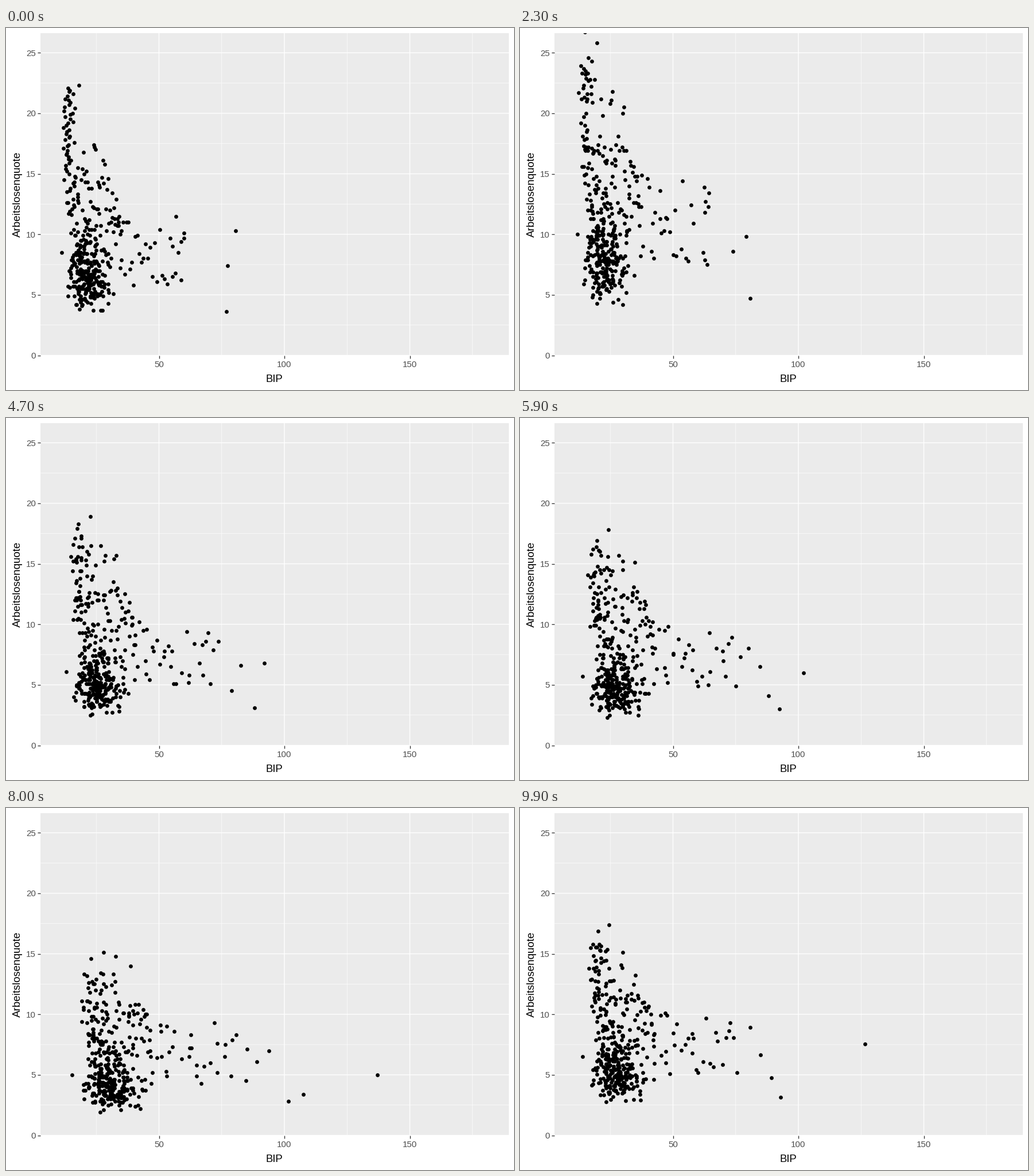
Recreate the animation shown at these times as a matplotlib script. Size 885x632 px, loop 10000 ms.

```python
import numpy as np
import matplotlib.pyplot as plt
from matplotlib.animation import FuncAnimation

W, H, DPI = 885, 632, 128
PX = 72 / DPI  # points per pixel
YEARS = 18
plt.rcParams["font.family"] = "Liberation Sans"
rng = np.random.default_rng(4)
year = np.arange(YEARS)


def keyed(*values, keys=(0, 4, 6, 8, 12, 17)):
    return np.interp(year, keys, values)


# Yearly trends: share of total growth, mean unemployment by region
growth = keyed(0, .12, .24, .35, .62, 1)
west = keyed(6.6, 7.9, 7.6, 4.9, 4.3, 3.7)
east = keyed(17, 18.7, 17, 13, 11, 7.7)
city = west * (1.15 + .032 * year)
old_town = east * (.74 + .018 * year)


def normal(n, cut=2.2):
    return np.clip(rng.normal(size=n), -cut, cut)


def drift(n, size):
    steps = rng.normal(0, size, (YEARS, n))
    steps[0] = 0
    return np.exp(np.cumsum(steps, axis=0))


def group(bip, rate, gain, trend):
    """Districts that share a trend, each with its own small drift."""
    n = len(bip)
    x = bip * (1 + gain * growth[:, None]) * drift(n, .009)
    y = rate * trend[:, None] * drift(n, .025)
    return x, np.maximum(y, .4 * west[:, None])


def single(bip, rate, trend=city):
    """One district from its first and last values, bent along a trend."""
    x = bip[0] + (bip[1] - bip[0]) * growth
    shape = trend / trend[0]
    pull = rate[1] / (rate[0] * shape[-1])
    y = rate[0] * shape * pull ** (year / year[-1])
    return x[:, None], y[:, None]


def car_town():
    x = keyed(80.5, 74, 92, 80, 124, 137, 114, 181, 172.5,
              keys=(0, 4, 8, 9, 11, 14, 15, 16, 17))
    y = keyed(10.3, 5.1, 4.85, keys=(0, 12, 17))
    return x[:, None], y[:, None]


def eastern_countryside(n=62):
    rate = rng.permutation(np.linspace(.68, 1.3, n))
    return group(14.4 * np.exp(.11 * normal(n, 1.8)), rate, .9, east)


def eastern_towns(n=40):
    q = np.linspace(0, 1, n)
    rate = (1.2 - .35 * q) * np.exp(.13 * normal(n, 1.8))
    return group(19 + 16 * q, rate, .45, old_town)


def western_countryside(n=220):
    z = normal(n)
    rate = np.exp(.28 * np.clip(.97 * normal(n) - .25 * z, -2.1, 2.3))
    return group(20.2 * np.exp(.175 * z), rate, .58, west)


def western_cities(n=71):
    q = np.linspace(0, 1, n)
    rate = np.exp((.33 - .15 * q) * normal(n, 1.6))
    return group(24 + 36 * q ** 2.3, rate, .45, city)


def build():
    parts = [
        eastern_countryside(), eastern_towns(),
        western_countryside(), western_cities(), car_town(),
        single((77.3, 92.4), (7.4, 5.9)),
        single((76.9, 108.9), (3.6, 2.7)),
        single((55.4, 123), (6.5, 3)),
        single((56.8, 104.8), (11.5, 6.3)),
        single((60, 84.7), (9.7, 7.6)),
        single((58.8, 92.2), (6.2, 4.2)),
        single((11.2, 16.7), (8.5, 4.5), west),
        single((18.1, 30.9), (22.3, 12.5), east),
    ]
    x, y = (np.hstack(axis) for axis in zip(*parts))
    y = np.round(y, 1)
    # the last year leads back to the first
    return np.vstack([x, x[:1]]), np.vstack([y, y[:1]])


BIP, RATE = build()

# Eleven slow moves of three steps, then seven quick ones of two
START = np.where(year < 11, 3 + 6 * year, 69 + 5 * (year - 11))
STEPS = np.where(year < 11, 3, 2)


def moment(frame):
    return np.clip((frame - START + 1) / STEPS, 0, 1).sum()


def blend(table, t):
    k = min(int(t + 1e-9), YEARS - 1)
    return table[k] + (t - k) * (table[k + 1] - table[k])


fig = plt.figure(figsize=(W / DPI, H / DPI), dpi=DPI, facecolor="white")
left, right, top, bottom = 60, 875.8, 9.2, 571.5
ax = fig.add_axes([left / W, 1 - bottom / H, (right - left) / W, (bottom - top) / H],
                  facecolor="#EBEBEB")
ax.set_xlim((left - 48) / 4.37, (right - 48) / 4.37)
ax.set_ylim(0, (bottom - top) / 21.13)
ax.set_xticks([50, 100, 150])
ax.set_xticks([25, 75, 125, 175], minor=True)
ax.set_yticks(range(0, 26, 5))
ax.set_yticks(np.arange(2.5, 25, 5), minor=True)
ax.set_axisbelow(True)
ax.grid(which="major", color="white", lw=1.33 * PX, snap=False)
ax.grid(which="minor", color="white", lw=.67 * PX, snap=False)
ax.tick_params(which="major", length=4.6 * PX, width=1.33 * PX, pad=3.7 * PX,
               color="#333333", labelcolor="#4D4D4D", labelsize=15 * PX)
ax.tick_params(axis="x", pad=5 * PX)
ax.tick_params(which="minor", length=0)
for spine in ax.spines.values():
    spine.set_visible(False)

fig.text(467.5 / W, 1 - 618 / H, "BIP", size=18.5 * PX, ha="center", va="baseline")
fig.text(24.5 / W, 1 - 290.5 / H, "Arbeitslosenquote", size=18.8 * PX, rotation=90,
         rotation_mode="anchor", ha="center", va="baseline")

dots, = ax.plot([], [], "o", color="black", ms=6.8 * PX, mew=0)


def draw(frame):
    t = moment(frame)
    dots.set_data(blend(BIP, t), blend(RATE, t))
    return dots,


anim = FuncAnimation(fig, draw, frames=100, interval=100, repeat=True,
                     repeat_delay=0, blit=False)
plt.show()
```
